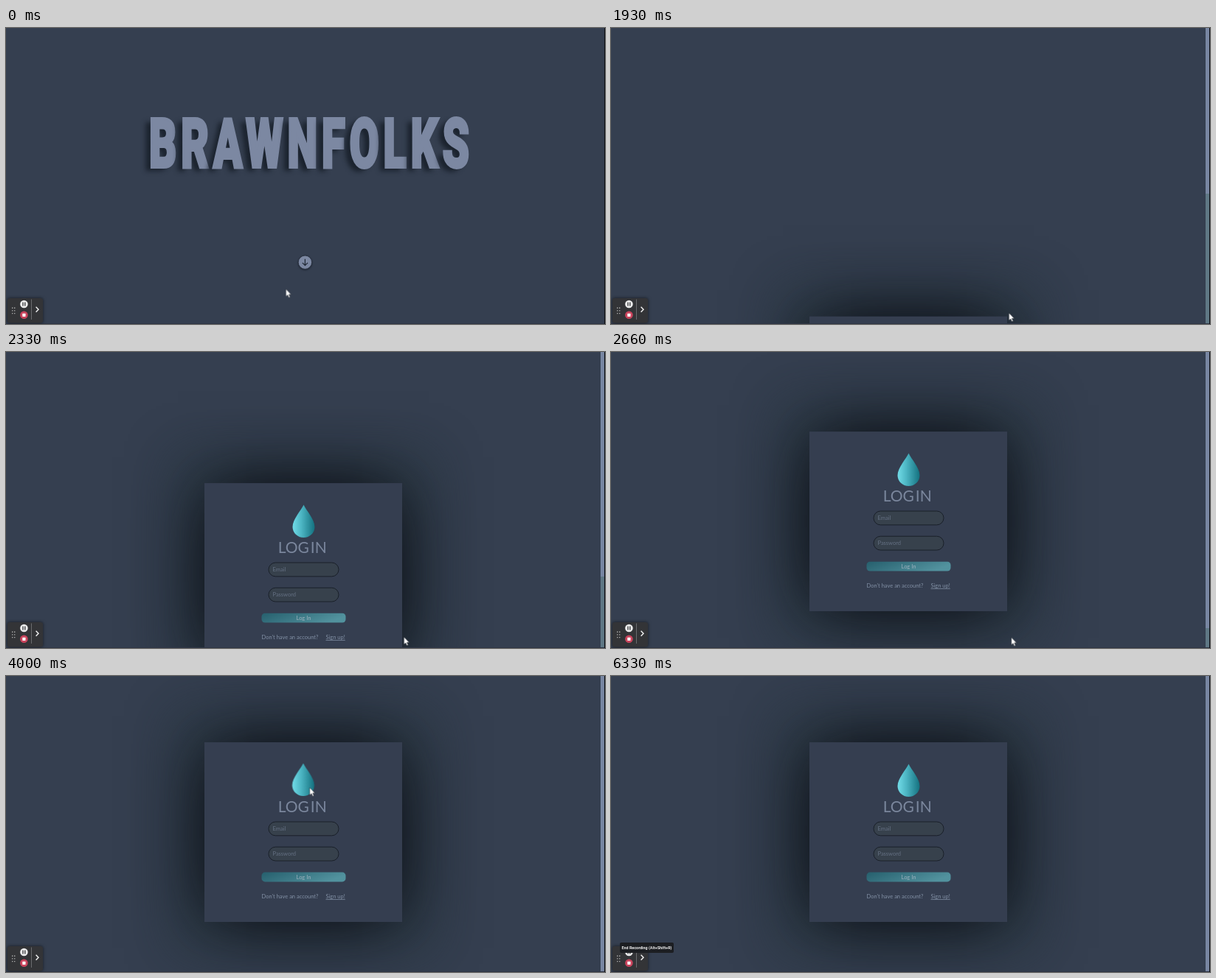
Recreate the animation shown at these times as an HTML page. Size 812 px wide and 402 px high, loop 6.4 s.

```html
<!DOCTYPE html>
<html lang="en">
<head>
<meta charset="utf-8">
<title>Log in</title>
<style>
  html, body { margin: 0; width: 100%; height: 100%; overflow: hidden; background: #353f50; }
  #stage { position: relative; width: 812px; height: 402px; overflow: hidden; background: #353f50; }
  #stage > *, #page > * { position: absolute; }
  svg { display: block; overflow: visible; }

  #page { left: 0; top: 0; width: 812px; height: 1402px; animation: scroll 6400ms linear infinite; }
  @keyframes scroll {
    0%, 11.5% { transform: translateY(0); }
    16% { transform: translateY(-120px); }
    20.83% { transform: translateY(-345px); }
    30.2% { transform: translateY(-698px); }
    36.46% { transform: translateY(-912px); }
    41.67% { transform: translateY(-982px); }
    48%, 100% { transform: translateY(-1000px); }
  }

  #title {
    left: 8px; top: 111.5px; width: 812px; margin: 0;
    font: 900 92px/92px Roboto, sans-serif; letter-spacing: 9.3px;
    text-align: center; white-space: nowrap;
    color: #7c88a2; -webkit-text-stroke: 4px #7c88a2; transform: scaleX(.63);
    text-shadow: -12px 5px 8px #1a222d;
  }

  #arrow { left: 396px; top: 309px; filter: drop-shadow(0 1px 1px #1c2430); }

  #panel {
    left: 268.5px; top: 1090px; width: 268.5px; height: 244px; background: #353e50;
    box-shadow: 0 0 100px #06060c, 0 0 60px 36px rgba(45, 62, 72, .7);
  }
  #panel text { font: 7.5px Lato, sans-serif; fill: #8290a5; }
  #panel .head { font-size: 21px; word-spacing: -3.5px; fill: #7b879d; }
  #panel .hint { fill: #657184; }
  #panel .field { fill: #37414c; stroke: #1a2029; }

  #drop { animation: lift 6400ms ease-in-out infinite; }
  @keyframes lift {
    0%, 53% { transform: none; }
    57%, 87.5% { transform: translate(-.5px, -1px); }
    95%, 100% { transform: none; }
  }

  #track { left: 806px; top: 0; width: 5px; height: 402px; background: #5f7885; animation: show-track 6400ms step-end infinite; }
  #thumb { width: 5px; background: #7886a2; animation: grow 6400ms linear infinite; }
  @keyframes show-track { 0% { opacity: 0; } 11.5%, 100% { opacity: 1; } }
  @keyframes grow {
    0%, 11.5% { height: 0; }
    20.83% { height: 105px; }
    30.2% { height: 225px; }
    36.46% { height: 305px; }
    41.67% { height: 375px; }
    50%, 100% { height: 402px; }
  }

  #edge { left: 811px; top: 0; width: 1px; height: 402px; background: #0b0d12; }
  #floor { left: 0; top: 401px; width: 811px; height: 1px; background: #2d3444; }

  #tools { left: 2px; top: 367px; filter: drop-shadow(0 0 2px rgba(0, 0, 0, .6)); }

  #tip {
    left: 12px; top: 362px; width: 73px; height: 14px; border-radius: 2px;
    background: #1c1e22; color: #f2f2f2; text-align: center; white-space: nowrap;
    font: 700 5.4px/14px Roboto, sans-serif; animation: show-tip 6400ms step-end infinite;
  }
  @keyframes show-tip { 0% { opacity: 0; } 98%, 100% { opacity: 1; } }

  #cursor { left: 0; top: 0; animation: point 6400ms ease-in-out infinite, hide 6400ms step-end infinite; }
  @keyframes point {
    0%, 1% { transform: translate(379.5px, 354.5px); }
    8.5%, 12% { transform: translate(410px, 317px); }
    20%, 36.5% { transform: translate(539.5px, 387px); }
    41.67%, 44% { transform: translate(542.7px, 387.6px); }
    53%, 85% { transform: translate(411.7px, 151.6px); }
    96%, 100% { transform: translate(26px, 388px); }
  }
  @keyframes hide { 0% { opacity: 1; } 97.5%, 100% { opacity: 0; } }
</style>
</head>
<body>
<div id="stage">
  <div id="page">
    <h1 id="title">BRAWNFOLKS</h1>
    <svg id="arrow" width="19" height="19">
      <circle cx="9.4" cy="9.2" r="9.2" fill="#7c88a2" stroke="#222a37" stroke-width=".8"/>
      <path d="M9.4 4.7V13.5M5.8 9.9L9.4 13.5L13 9.9" fill="none" stroke="#1f2733" stroke-width="1.2"/>
    </svg>
    <div id="panel">
      <svg width="268.5" height="244">
        <defs>
          <linearGradient id="water">
            <stop offset="0" stop-color="#72dce8"/>
            <stop offset=".4" stop-color="#4cb5c3"/>
            <stop offset="1" stop-color="#14717f"/>
          </linearGradient>
          <linearGradient id="teal" x2="1" y2=".3">
            <stop offset="0" stop-color="#265f6d"/>
            <stop offset="1" stop-color="#52929e"/>
          </linearGradient>
        </defs>
        <path id="drop" fill="url(#water)" d="M134.5 29.6C138 37 149.5 49.5 149.5 59.5A15 14.5 0 0 1 119.5 59.5C119.5 49.5 131 37 134.5 29.6Z"/>
        <text class="head" x="132.7" y="95" text-anchor="middle">LOG IN</text>
        <rect class="field" x="87" y="108" width="95" height="18.8" rx="9.4"/>
        <text class="hint" x="92.5" y="120">Email</text>
        <rect class="field" x="87" y="142.2" width="95" height="18.8" rx="9.4"/>
        <text class="hint" x="92.5" y="154.3">Password</text>
        <rect x="77.5" y="176.6" width="114" height="12.8" rx="4.5" fill="url(#teal)"/>
        <text x="134.5" y="185.8" text-anchor="middle" style="fill:#9cb0bd">Log In</text>
        <text x="77.5" y="212">Don't have an account?</text>
        <text x="164.5" y="212" text-decoration="underline">Sign up!</text>
      </svg>
    </div>
  </div>

  <div id="track"><div id="thumb"></div></div>
  <div id="edge"></div>
  <div id="floor"></div>

  <svg id="tools" width="48" height="34">
    <rect width="48" height="33.5" rx="3" fill="#333437"/>
    <path d="M6.7 12.6V22M9.7 12.6V22" stroke="#b5b5b5" stroke-width="1.3" stroke-dasharray="1.3 2.4"/>
    <circle cx="22.4" cy="8" r="5.3" fill="#ececec"/>
    <path d="M21 5.5V10.5M23.8 5.5V10.5" stroke="#333437" stroke-width="1.3"/>
    <circle cx="22.4" cy="22.8" r="5.3" fill="#c9445c"/>
    <rect x="20.3" y="20.7" width="4.2" height="4.2" rx=".5" fill="#fff"/>
    <path d="M32.5 1.5V29" stroke="#6a6b6e"/>
    <path d="M38.6 11.8L42 15.3L38.6 18.8" fill="none" stroke="#f2f2f2" stroke-width="1.4"/>
  </svg>
  <div id="tip">End Recording (Alt+Shift+R)</div>

  <svg id="cursor" width="8" height="13">
    <path d="M0 0V10.2L2.3 8.1L3.9 11.8L5.6 11L4 7.4H7Z" fill="#fff" stroke="#20242c" stroke-width=".5"/>
  </svg>
</div>
<script>
  // One span per letter, so each shadow falls on the letter before it.
  const title = document.getElementById('title');
  title.innerHTML = [...title.textContent].map(c => `<span>${c}</span>`).join('');

  // All motion advances together at 15 steps a second.
  const LOOP = 6400, STEP = 200 / 3;
  const motions = document.getAnimations();
  motions.forEach(m => m.pause());

  function tick() {
    const t = performance.now() % LOOP;
    const time = Math.min(95, Math.floor((t + 6.7) / STEP)) * STEP;
    motions.forEach(m => { m.currentTime = time; });
    requestAnimationFrame(tick);
  }
  tick();
</script>
</body>
</html>
```
